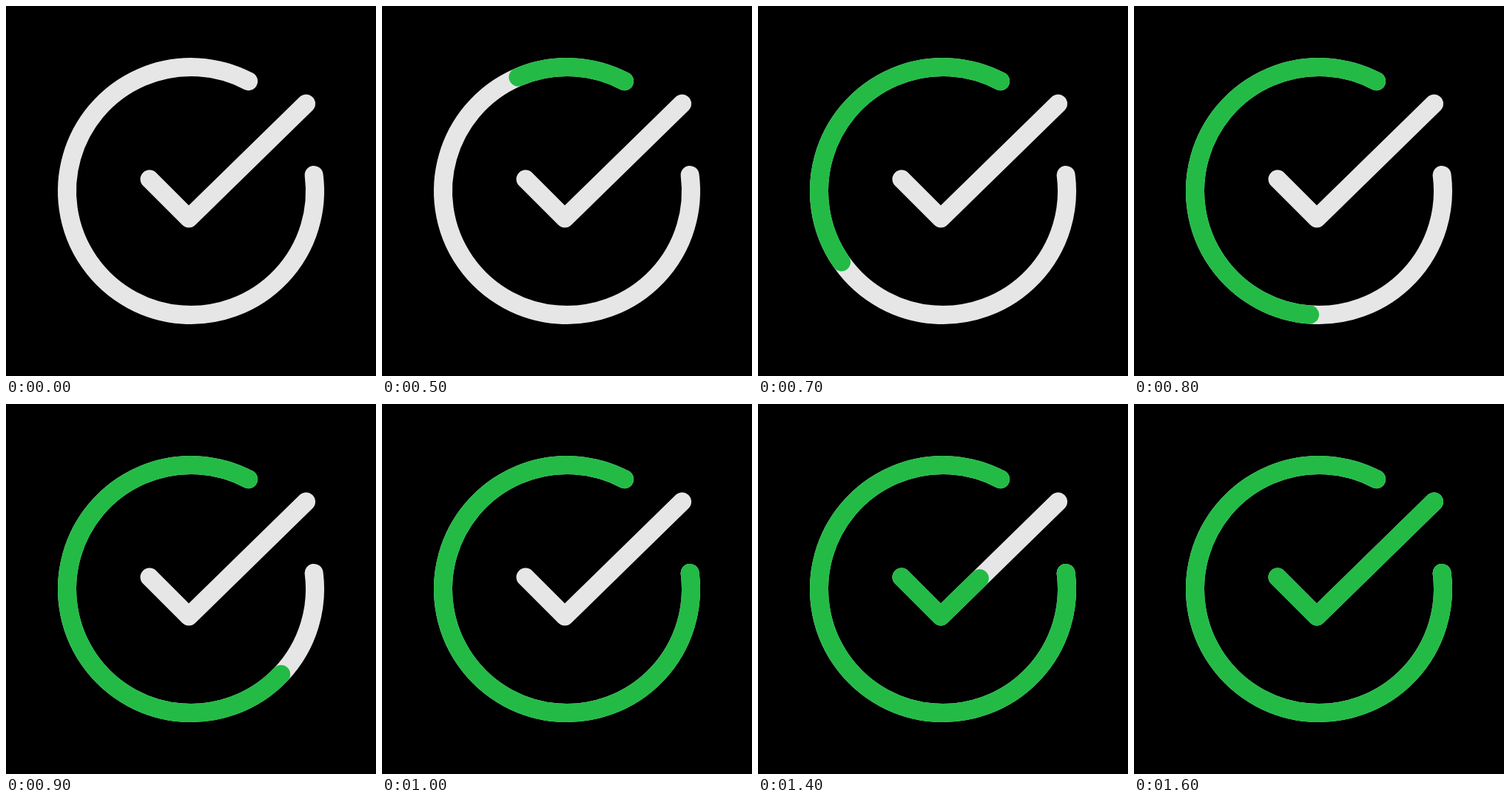
An HTML page for the animation above (4100 ms loop, 500 by 500 pixels).

```html
<!DOCTYPE html>
<html lang="en">
<head>
<meta charset="utf-8">
<title>Check mark</title>
<style>
html, body { margin: 0; height: 100%; background: #000; overflow: hidden; }
svg { display: block; width: 100%; height: 100%; }
path { fill: none; stroke: #e6e6e6; stroke-width: 25; stroke-linecap: round; stroke-linejoin: round; }
.fill { stroke: #23bb46; }
</style>
</head>
<body>
<svg viewBox="0 0 500 500">
  <path d="M327.6 101.6A167.5 167.5 0 1 0 416.1 228.4"/>
  <path d="M194 234L247 287L405.5 132"/>
  <path class="fill" id="ring" pathLength="1" d="M327.6 101.6A167.5 167.5 0 1 0 416.1 228.4"/>
  <path class="fill" id="tick" pathLength="1" d="M194 234L247 287L405.5 132"/>
</svg>
<script>
const LOOP = 4100, STEP = 100;
const ring = document.getElementById('ring');
const tick = document.getElementById('tick');

// Reveals a path in equal steps, the first one at the start time.
function reveal(path, time, start, steps) {
  const done = Math.floor((time - start) / STEP) + 1;
  const part = Math.max(0, Math.min(1, done / steps));
  path.style.visibility = part ? 'visible' : 'hidden';
  path.style.strokeDasharray = part < 1 ? part + ' 2' : 'none';
}

const begin = performance.now();
function draw() {
  const time = (performance.now() - begin) % LOOP;
  reveal(ring, time, 500, 6);
  reveal(tick, time, 1300, 4);
  requestAnimationFrame(draw);
}
draw();
</script>
</body>
</html>
```
